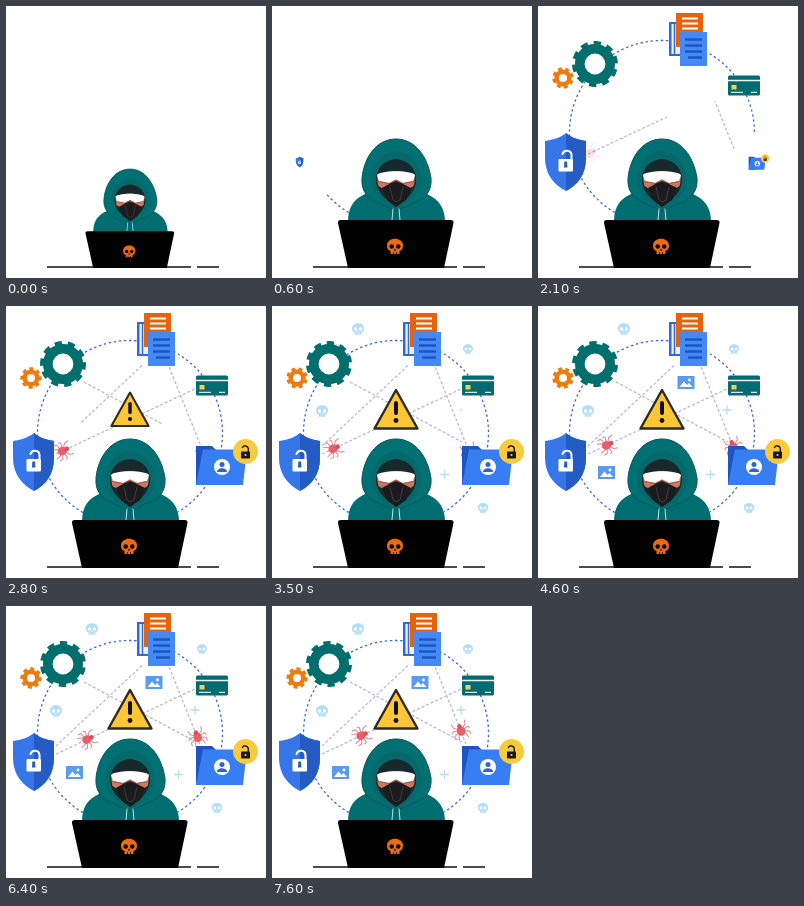
An HTML page that plays this animation: 260x272 px, repeating every 7.7 s.

```html
<!DOCTYPE html>
<html lang="en">
<head>
<meta charset="utf-8">
<title>Cyber threat</title>
<style>
  html, body { margin: 0; width: 100%; height: 100%; overflow: hidden; background: #fff; }
  svg { display: block; width: 100%; height: 100%; }
  [data-at], .teeth { transform-box: fill-box; transform-origin: center; }
  #hacker { transform-origin: 124px 262px; }
  .line { fill: none; stroke-linecap: round; stroke-linejoin: round; }
  .links line { stroke: #b7b2dc; stroke-width: 1.2; stroke-dasharray: 3 2; }
  .pale { fill: #b3defa; color: #fff; }
</style>
</head>
<body>
<svg viewBox="0 0 260 272">
  <defs>
    <g id="skull">
      <path d="M-8-1C-8-10 8-10 8-1C8 2 7 4 4.5 4.5V7.5H-4.5V4.5C-7 4-8 2-8-1Z"/>
      <g fill="currentColor">
        <circle cx="-3.3" cy="0" r="2.2"/><circle cx="3.3" cy="0" r="2.2"/>
        <path d="M0 2l1.2 2h-2.4zM-2 5.5h.8v2h-.8zM1.2 5.5h.8v2h-.8z"/>
      </g>
    </g>
    <g id="bug">
      <path class="line" stroke="#e8808a" stroke-width="1" d="M-3-2L-6-4L-7-8M-3 0L-8-1L-9 1M-3 2L-8 4L-8 7M-3 3L-5 9M3-2L6-4L7-8M3 0L8-1L9 1M3 2L8 4L8 7M3 3L5 9"/>
      <ellipse cy="1" rx="4.2" ry="4.8" fill="#e65f6b"/>
      <circle cy="-4" r="2.3" fill="#d94f5c"/>
    </g>
    <g id="photo">
      <rect width="17" height="13" fill="#5a9bf0"/>
      <path d="M2 11L6.5 5.5L9.5 9L11.5 7L15 11Z" fill="#fff"/>
      <circle cx="12" cy="4" r="1.4" fill="#fff"/>
    </g>
    <path id="plus" d="M-4.5 0H4.5M0-4.5V4.5" stroke="#b5e0f5" stroke-width="1.4"/>
  </defs>

  <path id="ring" class="line" stroke="#3a69dc" stroke-width="1.3" stroke-dasharray="2.4 2.7" style="stroke-linecap:butt"/>

  <g class="links">
    <line data-from="1700" x1="50" y1="148" data-end="190,82.5"/>
    <line data-from="1700" x1="196" y1="143" data-end="162,58"/>
    <line data-from="2300" x1="78" y1="76" data-end="190,136"/>
    <line data-from="2300" x1="136" y1="59.5" data-end="50,140"/>
  </g>

  <use id="bugA" href="#bug"/>
  <use id="bugB" href="#bug"/>

  <!-- shield -->
  <g data-at="565">
    <path d="M28 127C22 132 14 134 7 135V152C7 168 16 179 28 185C40 179 48 168 48 152V135C41 134 34 132 28 127Z" fill="#3676e8"/>
    <path d="M28 127V185C40 179 48 168 48 152V135C41 134 34 132 28 127Z" fill="#245cc4"/>
    <rect x="20.5" y="153" width="14.5" height="12.5" rx="1" fill="#fff"/>
    <path class="line" d="M33.5 153V149A4.6 4.6 0 0 0 24.5 148" stroke="#fff" stroke-width="2"/>
    <path d="M26.3 157.5a1.6 1.6 0 1 1 2.8 0l.4 4h-3.6z" fill="#245cc4"/>
  </g>

  <!-- gears -->
  <g data-at="990" fill="none" stroke="#006e6d">
    <circle cx="57" cy="58" r="15.2" stroke-width="9.6" fill="#fff"/>
    <circle class="teeth" data-spin="1" cx="57" cy="58" r="20.7" stroke-width="4.6" pathLength="20" stroke-dasharray="1.1 .9"/>
  </g>
  <g data-at="960" fill="none" stroke="#ec7c0e">
    <circle cx="25" cy="72" r="6.3" stroke-width="4.6" fill="#fff"/>
    <circle class="teeth" data-spin="-1.5" cx="25" cy="72" r="9" stroke-width="3.4" pathLength="16" stroke-dasharray="1.1 .9"/>
  </g>

  <!-- documents -->
  <g data-at="1395">
    <rect x="131" y="16" width="20" height="34" fill="#2f6ad6"/>
    <path d="M133.500 18H138V41H142V48H133.500Z" fill="#eaf1fd"/>
    <path d="M136.500 16V50" stroke="#2f6ad6" stroke-width="1.500"/>
    <rect x="138" y="7" width="27" height="34" fill="#e4630b"/>
    <path d="M144 12.500H160M144 17.500H160M144 22.500H160" stroke="#fff" stroke-width="2"/>
    <rect x="142" y="26" width="27" height="34" fill="#4589f4"/>
    <path d="M147 33.500H164M147 39.500H164M147 45.500H164M150 51.500H164" stroke="#1b55c6" stroke-width="2.400"/>
  </g>

  <!-- card -->
  <g data-at="1695">
    <rect x="190" y="69.500" width="32" height="20" rx="1.500" fill="#006c71"/>
    <path d="M190 74.500H222" stroke="#eef7f7" stroke-width="1.500"/>
    <rect x="193.500" y="79" width="5" height="4.500" fill="#f9cf4a"/>
    <path d="M193 86.300H205M213 86.300H219" stroke="#d3e8e8" stroke-width="1.200"/>
  </g>

  <!-- folder -->
  <g data-at="2035">
    <path d="M190 140H206L210 144V179H190Z" fill="#1f55c0"/>
    <path d="M197 143.500H241L237 179H190Z" fill="#387ef3"/>
    <circle cx="216" cy="161" r="8" fill="#fff"/>
    <circle cx="216" cy="158.500" r="2.500" fill="#2b66d9"/>
    <path d="M211 166C211 161 221 161 221 166Z" fill="#2b66d9"/>
    <circle cx="239.500" cy="145.500" r="12.500" fill="#fbca3c"/>
    <rect x="235" y="145.500" width="9" height="7" rx=".8" fill="#191919"/>
    <path class="line" d="M242.300 145.500V142.500A3.100 3.100 0 0 0 236.500 141.500" stroke="#191919" stroke-width="1.500"/>
    <circle cx="239.500" cy="149" r="1.100" fill="#fbca3c"/>
  </g>

  <!-- warning -->
  <g data-at="2600">
    <path d="M124 84L145.500 122.500H102.500Z" fill="#fdc636" stroke="#2e2a20" stroke-width="2.400" stroke-linejoin="round"/>
    <path class="line" d="M124 97V107" stroke="#111" stroke-width="4"/>
    <circle cx="124" cy="114.500" r="2.400" fill="#111"/>
  </g>

  <g class="pale">
    <g data-at="2800"><use href="#skull" transform="translate(86 23) scale(.75)"/></g>
    <g data-at="2900"><use href="#skull" transform="translate(196 43) scale(.62)"/></g>
    <g data-at="3000"><use href="#skull" transform="translate(50 105) scale(.75)"/></g>
    <g data-at="3100"><use href="#skull" transform="translate(211 202) scale(.65)"/></g>
  </g>
  <g data-at="3150"><use href="#plus" x="172.500" y="168.500"/></g>
  <g data-at="3420"><use href="#plus" x="189" y="104"/></g>
  <g data-at="3700"><use href="#photo" x="139.500" y="70"/></g>
  <g data-at="3900"><use href="#photo" x="60" y="160"/></g>

  <path d="M41 261H185M191 261H213" stroke="#111" stroke-width="1.600"/>

  <g id="hacker">
    <path d="M76 216C76 203 80 194 93 188L124 180L155 188C168 194 173 203 173 216Z" fill="#006d70"/>
    <path d="M124 133C104 133 92 152 90 172C89 185 95 193 109 198L124 205L139 198C154 193 160 185 159 172C156 152 144 133 124 133Z" fill="#007072" stroke="#075558" stroke-width="1"/>
    <path d="M124 145C108 147 99 160 99 175C100 188 111 197 124 203C137 197 148 188 149 175C149 160 140 147 124 145Z" fill="#06686b"/>
    <path d="M124 153C111 154 104 163 104 174C104 185 113 194 124 200C135 194 144 185 144 174C144 163 137 154 124 153Z" fill="#17292d"/>
    <path d="M105 170Q124 160 143 170L142 179C139 186 109 186 106 179Z" fill="#cf7860"/>
    <path d="M105 169C109 164 139 164 143 169L141 175L131 177L124 173.500L117 177L107 175Z" fill="#fff"/>
    <path class="line" d="M107 175.500L117 177.500L124 174L131 177.500L141 175.500" stroke="#8d4a3c" stroke-width=".8"/>
    <path d="M110 182L118 177.500L124 175L130 177.500L139 182L134 194L124 201L115 194Z" fill="#1b1a1d"/>
    <path class="line" d="M118 181L121 194L124 196L128 194L131 181" stroke="#454347" stroke-width=".8"/>
    <path class="line" d="M121 203L120 214M127 203L128 214" stroke="#c4e4e3" stroke-width="1"/>
    <path d="M66 217Q65.500 214 69 214H178.500Q182 214 181.500 217L172 262H76Z" fill="#020202"/>
    <use href="#skull" transform="translate(123 240.500)" fill="#ec6a12" color="#020202"/>
  </g>
</svg>
<script>
  const LOOP = 7700, STEP = 100;
  const CX = 124, CY = 127, R = 92.5, START = 120.7, SWEEP = 298;
  const $ = id => document.getElementById(id);
  const pops = [...document.querySelectorAll('[data-at]')];
  const teeth = [...document.querySelectorAll('.teeth')];
  const links = [...document.querySelectorAll('.links line')];

  const progress = (t, from, span) => Math.min(1, Math.max(0, (t - from) / span));
  const easeOut = u => Math.sin(u * Math.PI / 2);
  const onRing = deg => {
    const a = deg * Math.PI / 180;
    return `${CX + R * Math.cos(a)} ${CY + R * Math.sin(a)}`;
  };

  function drawRing(t) {
    const sweep = SWEEP * progress(t, 473, SWEEP / 0.147);
    $('ring').setAttribute('d', sweep
      ? `M${onRing(START)}A${R} ${R} 0 ${sweep > 180 ? 1 : 0} 1 ${onRing(START + sweep)}`
      : '');
  }

  function drawLink(el, t) {
    const u = progress(t, +el.dataset.from, 710);
    const [ex, ey] = el.dataset.end.split(',').map(Number);
    const x = +el.getAttribute('x1'), y = +el.getAttribute('y1');
    el.setAttribute('x2', x + (ex - x) * u);
    el.setAttribute('y2', y + (ey - y) * u);
    el.style.visibility = u ? 'visible' : 'hidden';
  }

  function placeBug(id, x, y, turn, opacity) {
    $(id).setAttribute('transform', `translate(${x} ${y}) rotate(${turn})`);
    $(id).style.opacity = opacity;
  }

  function render(t) {
    $('hacker').style.transform = `scale(${0.767 + 0.233 * easeOut(progress(t, 0, 400))})`;
    drawRing(t);
    links.forEach(el => drawLink(el, t));
    pops.forEach(el => {
      el.style.transform = `scale(${easeOut(progress(t, +el.dataset.at, 300))})`;
    });
    teeth.forEach(el => {
      el.style.transform = `rotate(${t * 0.024 * el.dataset.spin}deg)`;
    });

    // Bugs crawl along the first two links.
    const ax = 62 + (t - 3500) * 0.00683;
    placeBug('bugA', ax, 148 - (ax - 50) * 0.4675, 65, progress(t, 2000, 500));
    const by = 140 - (t - 4600) * 0.00533;
    placeBug('bugB', 163.5 + (by - 60) * 0.395, by, -21, progress(t, 2400, 500));
  }

  const origin = performance.now();
  function tick() {
    const t = (performance.now() - origin) % LOOP;
    render(Math.floor(t / STEP) * STEP);
    requestAnimationFrame(tick);
  }
  tick();
</script>
</body>
</html>
```
